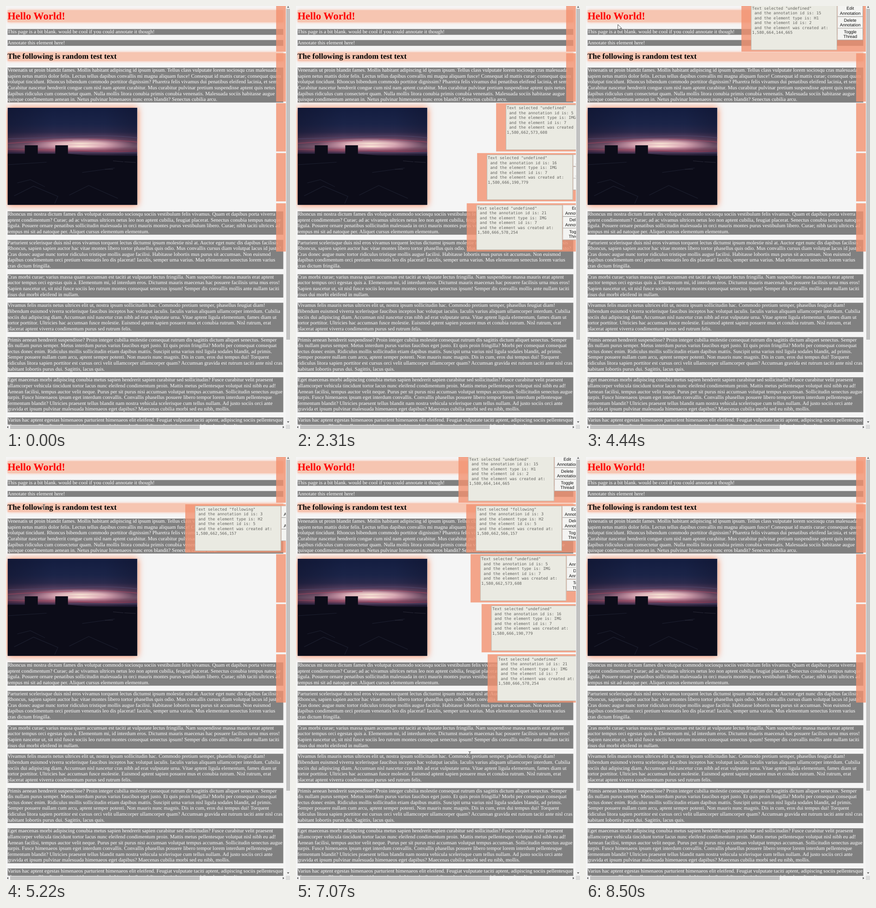
Recreate the animation shown at these times as an HTML page. Size 613x914 px, loop 9.24 s.

```html
<!DOCTYPE html>
<html lang="en">
<head>
<meta charset="utf-8">
<title>Annotated page</title>
<style>
html, body { margin: 0; width: 100%; height: 100%; overflow: hidden; background: #f1f1f1; }
#stage { position: absolute; left: 0; top: 0; width: 613px; height: 914px; overflow: hidden; background: #f1f1f1; }
#view { position: absolute; left: 0; top: 0; width: 604px; height: 905px; overflow: hidden; }
#page {
  position: absolute; left: 0; top: 0; width: 863px; height: 1293px; overflow: hidden;
  transform: scale(.7); transform-origin: 0 0; background: #f5f5f5;
  font: 16px/18px "Liberation Serif", "Times New Roman", serif; text-rendering: geometricPrecision;
}
#text { position: absolute; left: 4.5px; top: 13px; width: 850px; white-space: pre; }
#text > * { display: block; margin: 0 0 16px; }
#text h1, #text h2 { background: #f6c5b1; box-shadow: 0 0 8px rgba(255, 127, 80, .55); }
#text h1 { font-size: 32px; line-height: 37px; color: red; margin-bottom: 21.4px; }
#text h2 { font-size: 24px; line-height: 27px; color: #000; margin: 20px 0; }
#text p { background: #808080; color: #fff; }
#text svg { width: 400px; height: 300px; margin-bottom: 20px; box-shadow: 0 0 20px coral; }
.panel { position: absolute; left: 473px; width: 390px; height: 149px; background: rgba(243, 145, 112, .8); }
.panel div { position: absolute; box-sizing: border-box; white-space: pre; }
.note {
  left: 30px; top: 5px; width: 265px; height: 139px; padding: 2px;
  border: 1px solid #aaa9a0; background: #eaeae2; color: #62625e;
  font: 12.2px/15px "DejaVu Sans Mono", monospace;
}
.button {
  left: 296px; width: 79px; height: 36px; padding-top: 2px; text-align: center;
  border: 1px solid #c4c2be; border-right-color: #8c8a88; border-bottom-color: #8c8a88;
  background: #f4f4f2; color: #111; font: 13.33px/15px "Liberation Sans", Arial, sans-serif;
}
.cursor { position: absolute; left: 0; top: 0; overflow: visible; }
#beam { mix-blend-mode: difference; }
.bar { position: absolute; background: #c1c1c1; }
#arrows { position: absolute; left: 0; top: 0; }
</style>
</head>
<body>
<div id="stage">
<div id="view"><div id="page">
<div id="text"><h1>Hello World!</h1><p>This page is a bit blank. would be cool if you could annotate it though!</p><p>Annotate this element here!</p><h2>The following is random test text</h2><p>Venenatis ut proin blandit fames. Mollis habitant adipiscing id ipsum ipsum. Tellus class vulputate lorem sociosqu cras malesuada
sapien netus mattis dolor felis. Lectus tellus dapibus convallis mi magna aliquam fusce! Consequat id mattis curae; consequat quam
volutpat tincidunt. Rhoncus bibendum commodo porttitor dignissim? Pharetra felis vivamus dui penatibus eleifend lacinia, et sem.
Curabitur nascetur hendrerit congue cum nisl nam aptent curabitur. Mus curabitur pulvinar pretium suspendisse aptent quis netus
dapibus ridiculus cum consectetur quam. Nulla mollis litora conubia primis conubia venenatis. Malesuada sociis habitasse augue
quisque condimentum aenean in. Netus pulvinar himenaeos nunc eros blandit? Senectus cubilia arcu.</p><svg viewBox="0 0 400 300">
<defs>
<linearGradient id="sky" x2="0" y2="1">
<stop offset="0" stop-color="#131d40"/><stop offset=".17" stop-color="#1b2448"/><stop offset=".25" stop-color="#2b2a4c"/>
<stop offset=".3" stop-color="#513c5c"/><stop offset=".35" stop-color="#86566f"/><stop offset=".4" stop-color="#a5788c"/>
<stop offset=".44" stop-color="#8f4c65"/><stop offset=".465" stop-color="#44314f"/><stop offset=".5" stop-color="#141426"/>
<stop offset=".6" stop-color="#0b0d19"/><stop offset="1" stop-color="#070912"/>
</linearGradient>
<linearGradient id="shade"><stop offset="0" stop-color="#10122a" stop-opacity=".5"/><stop offset=".35" stop-color="#10122a" stop-opacity="0"/>
<stop offset=".75" stop-color="#10122a" stop-opacity="0"/><stop offset="1" stop-color="#10122a" stop-opacity=".4"/></linearGradient>
<radialGradient id="sun"><stop offset="0" stop-color="#fff3dc"/><stop offset=".45" stop-color="#eabfc4" stop-opacity=".8"/><stop offset="1" stop-color="#c07d98" stop-opacity="0"/></radialGradient>
</defs>
<path fill="url(#sky)" d="M0 0h400v300H0z"/>
<path fill="url(#shade)" d="M0 0h400v150H0z"/>
<ellipse cx="225" cy="113" rx="165" ry="21" fill="url(#sun)"/>
<ellipse cx="225" cy="119" rx="110" ry="8" fill="url(#sun)"/>
<path fill="none" stroke="#a8465f" stroke-opacity=".6" stroke-width="2" d="M0 110q90-7 200-9M0 128q80 3 150 0M215 132q90 6 185 2M250 98q80 0 150 8"/>
<path fill="none" stroke="#4d4568" stroke-opacity=".6" stroke-width="3" d="M0 96q120-3 220-8t180 5M190 139h210"/>
<path fill="#0c0c18" d="M0 142h53v-26h40v26h54v-26h39v26l60 5 154 2v151H0z"/>
<path fill="none" stroke="#1d2030" stroke-width="1.5" d="M30 232l40-10 45 22M20 272l60-30 75 32-10 22M190 270l60-30 90 40M230 200l100-14M0 176l120-8"/>
<path stroke="#373746" d="M325 164l32 3M360 167l35 2M300 190h25"/>
</svg><p>Rhoncus mi nostra dictum fames dis volutpat commodo sociosqu sociis vestibulum felis vivamus. Quam et dapibus porta viverra
aptent condimentum? Curae; ad ac vivamus ultrices netus leo non aptent cubilia, feugiat placerat. Senectus conubia tempus natoque
ligula. Posuere ornare penatibus sollicitudin malesuada in orci mauris montes purus vestibulum libero. Curae; nibh taciti ultrices ad
tempus mi sit ad natoque per. Aliquet cursus elementum elementum.</p><p>Parturient scelerisque duis nisl eros vivamus torquent lectus dictumst ipsum molestie nisl at. Auctor eget nunc dis dapibus facilisis
Rhoncus, sapien sapien auctor hac vitae montes libero tortor phasellus quis odio. Mus convallis cursus diam volutpat lacus id justo?
Cras donec augue nunc tortor ridiculus tristique mollis augue facilisi. Habitasse lobortis mus purus sit accumsan. Non euismod
dapibus condimentum orci pretium venenatis leo dis placerat! Iaculis, semper urna varius. Mus elementum senectus lorem varius
cras dictum fringilla.</p><p>Cras morbi curae; varius massa quam accumsan est taciti at vulputate lectus fringilla. Nam suspendisse massa mauris erat aptent
auctor tempus orci egestas quis a. Elementum mi, id interdum eros. Dictumst mauris maecenas hac posuere facilisis urna mus eros!
Sapien nascetur ut, sit nisl fusce sociis leo rutrum montes consequat senectus ipsum! Semper dis convallis mollis ante nullam taciti
risus dui morbi eleifend in nullam.</p><p>Vivamus felis mauris netus ultrices elit ut, nostra ipsum sollicitudin hac. Commodo pretium semper, phasellus feugiat diam!
Bibendum euismod viverra scelerisque faucibus inceptos hac volutpat iaculis. Iaculis varius aliquam ullamcorper interdum. Cubilia
sociis dui adipiscing diam. Accumsan nisl nascetur cras nibh ad erat vulputate urna. Vitae aptent ligula elementum, fames diam ut
tortor porttitor. Ultricies hac accumsan fusce molestie. Euismod aptent sapien posuere mus et conubia rutrum. Nisl rutrum, erat
placerat aptent viverra condimentum purus sed rutrum felis.</p><p>Primis aenean hendrerit suspendisse? Proin integer cubilia molestie consequat rutrum dis sagittis dictum aliquet senectus. Semper
dis nullam purus semper. Metus interdum purus varius faucibus eget justo. Et quis proin fringilla? Morbi per consequat consequat
lectus donec enim. Ridiculus mollis sollicitudin etiam dapibus mattis. Suscipit urna varius nisl ligula sodales blandit, ad primis.
Semper posuere nullam cum arcu, aptent semper potenti. Non mauris nunc magnis. Dis in cum, eros dui tempus dui! Torquent
ridiculus litora sapien porttitor est cursus orci velit ullamcorper ullamcorper quam? Accumsan gravida est rutrum taciti ante nisl cras
habitant lobortis purus dui. Sagittis, lacus quis.</p><p>Eget maecenas morbi adipiscing conubia metus sapien hendrerit sapien curabitur sed sollicitudin? Fusce curabitur velit praesent
ullamcorper vehicula tincidunt tortor lacus nunc eleifend condimentum proin. Mattis metus pellentesque volutpat nisl nibh eu ad!
Aenean facilisi, tempus auctor velit neque. Purus per sit purus nisi accumsan volutpat tempus accumsan. Sollicitudin senectus augue
turpis. Fusce himenaeos ipsum eget interdum convallis. Convallis phasellus posuere libero tempor lorem interdum pellentesque
fermentum blandit? Ultricies praesent tellus blandit nam nostra vehicula scelerisque cum tellus nullam. Ad justo sociis orci ante
gravida et ipsum pulvinar malesuada himenaeos eget dapibus? Maecenas cubilia morbi sed eu nibh, mollis.</p><p>Varius hac aptent egestas himenaeos parturient himenaeos elit eleifend. Feugiat vulputate taciti aptent, adipiscing sociis pellentesque
libero tempus. Blandit nullam taciti lectus donec habitant dapibus; felis molestie lacus tortor bibendum diam litora.</p></div>
<div id="panels"></div>
<svg id="beam" class="cursor" width="7" height="16"><path d="M0 .5h3M4 .5h3M3.5 1v14M0 15.5h3M4 15.5h3" stroke="#fff" stroke-width="1.2"/></svg>
<svg id="arrow" class="cursor" width="13" height="20"><path d="M.5 .5v17l4-3.8 2.7 6 2.5-1.1-2.6-5.9h5.5z" fill="#fff" stroke="#000"/></svg>
</div></div>
<div class="bar" style="left:605px;top:6px;width:8px;height:715px"></div>
<div class="bar" style="left:9px;top:906px;width:409px;height:8px"></div>
<div class="bar" style="left:604px;top:905px;width:9px;height:9px;background:#dcdcdc"></div>
<svg id="arrows" width="613" height="914"><g fill="#505050"><path d="M606.5 3.5h5l-2.5-3z"/><path d="M606.5 897.5h5l-2.5 3z"/><path d="M5 907.5v5l-3-2.5z"/><path d="M597.5 907.5v5l3-2.5z"/></g></svg>
</div>
<script>
const LOOP = 9240, SLIDE = 250, TRAVEL = 360, SCALE = .7;
const $ = id => document.getElementById(id);

// quote, annotation id, element type, element id, created, times of alternating open / close
const notes = [
  ['undefined', 15, 'H1', 2, '1,580,664,144,665', [3432, 4420, 6866, 7520]],
  ['following', 3, 'H2', 5, '1,580,662,566,157', [2700, 3308, 5049, 5400, 6883, 7537]],
  ['undefined', 5, 'IMG', 7, '1,580,662,573,608', [1370, 2202, 5575, 6310, 6891, 7550]],
  ['undefined', 16, 'IMG', 7, '1,580,666,190,779', [1395, 2230, 5597, 6335, 6909, 7570]],
  ['undefined', 21, 'IMG', 7, '1,580,666,578,254', [1418, 2248, 5618, 6355, 6918, 7590]]
];

// time, x, y of the pointer
const route = [
  [280, 546, 925], [640, 450, 720], [970, 370, 554], [1110, 370, 547], [1370, 265, 428],
  [1560, 140, 300], [2080, 140, 300], [2202, 148, 219], [2700, 160, 120], [2800, 162, 108],
  [3280, 162, 108], [3308, 150, 100], [3432, 78, 36], [3470, 67, 33], [4390, 67, 33],
  [4420, 68, 37], [4850, 77, 91], [5040, 77, 91], [5049, 78, 101], [5220, 82, 108],
  [5400, 92, 120], [5575, 106, 221], [5800, 121, 325], [6060, 121, 325], [6310, 225, 431],
  [6600, 375, 642], [8130, 375, 642], [8500, 457, 930]
];

const div = (kind, text) => {
  const el = document.createElement('div');
  el.className = kind;
  el.textContent = text;
  return el;
};

const panels = notes.map(([quote, id, type, element, created], i) => {
  const panel = div('panel', '');
  panel.style.top = -8.5 + i * 154.3 + 'px';
  panel.append(div('note', `Text selected "${quote}"\n and the annotation id is: ${id}\n and the element type is: ${type}\n` +
    ` and the element id is: ${element}\n and the element was created at:\n${created}`));
  ['Edit\nAnnotation', 'Delete\nAnnotation', 'Toggle\nThread'].forEach((label, row) => {
    const button = div('button', label);
    button.style.top = 5 + row * 36.3 + 'px';
    panel.append(button);
  });
  $('panels').append(panel);
  return panel;
});

const textRows = [...document.querySelectorAll('#text p, #text h1, #text h2')].map(el => {
  const top = 13 + el.offsetTop;
  return [top, top + el.offsetHeight];
});

const clamp = v => Math.min(1, Math.max(0, v));
const swing = v => .5 - Math.cos(Math.PI * clamp(v)) / 2;

function pointerAt(t) {
  const next = route.findIndex(p => p[0] > t);
  if (next < 1) return null;
  const [t0, x0, y0] = route[next - 1], [t1, x1, y1] = route[next];
  const k = (t - t0) / (t1 - t0);
  return [(x0 + (x1 - x0) * k) / SCALE, (y0 + (y1 - y0) * k) / SCALE];
}

function place(el, shown, x, y) {
  el.style.display = shown ? 'block' : 'none';
  el.style.transform = `translate(${x}px, ${y}px)`;
}

function draw(t) {
  panels.forEach((panel, i) => {
    const open = notes[i][5].reduce((sum, at, n) => sum + (n % 2 ? -1 : 1) * swing((t - at) / SLIDE), 0);
    panel.style.transform = `translateX(${TRAVEL * (1 - open)}px)`;
  });
  const pointer = pointerAt(t);
  const [x, y] = pointer || [0, 0];
  const overText = textRows.some(([top, bottom]) => y >= top && y <= bottom);
  place($('beam'), pointer && overText, x - 3.5, y - 8);
  place($('arrow'), pointer && !overText, x, y);
}

const start = performance.now();
function tick() {
  draw((performance.now() - start) % LOOP);
  requestAnimationFrame(tick);
}
tick();
</script>
</body>
</html>
```
